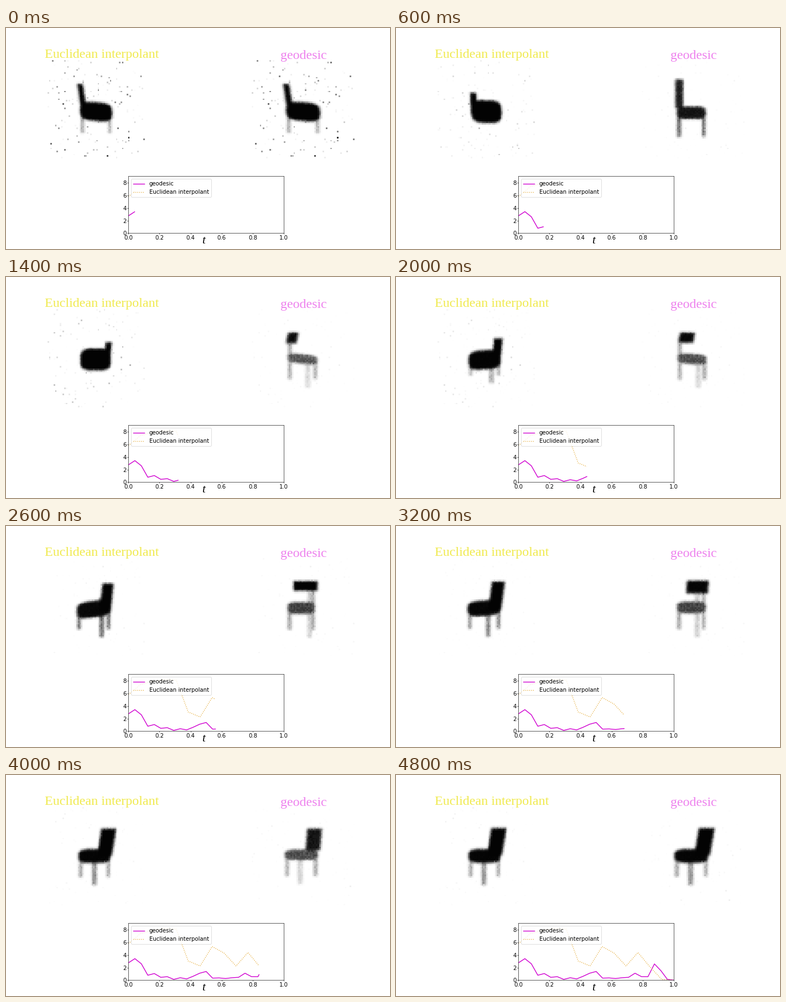
A matplotlib script for the animation above (5000 ms loop, 694x400 px).

```python
import numpy as np
import matplotlib.pyplot as plt
from matplotlib.animation import FuncAnimation

W, H, DPI = 694, 400, 100
FRAMES, INTERVAL = 25, 200
GRID, FINE = 64, 3
LEFT = (75, 251, 236.5, 58.6)
RIGHT = (444, 629.5, 236.5, 58.6)

# The two plotted series: speed at evenly spaced t
GEO_Y = np.array([2.75, 3.42, 2.6, .78, 1.05, .45, .55, .12, .38, .2, .62, 1.1, 1.38,
                  .32, .35, .26, .38, .45, 1.1, .56, .55, 2.58, 1.5, .12, 0])
EUC_Y = np.array([5.8, 7.4, 7.9, 8.2, 8.1, 3.05, 2.25, 5.35, 4.3, 2.25, 4.4, 2.1, .1, 0])
GEO_X = np.linspace(0, 1, len(GEO_Y))
EUC_X = np.linspace(0, 1, len(EUC_Y))
TIMES = (np.arange(FRAMES) + 1) / FRAMES

# Fine sample points and a matrix that blurs and shrinks to the coarse grid
centres = (np.arange(GRID * FINE) + .5) / (GRID * FINE)
X, Y = np.meshgrid(LEFT[0] + centres * (LEFT[1] - LEFT[0]),
                   LEFT[3] + centres * (LEFT[2] - LEFT[3]))
cells = (np.arange(GRID) + .5)[:, None]
SOFTEN = np.exp(-(centres * GRID - cells) ** 2 / (2 * .75 ** 2))
SOFTEN /= SOFTEN.sum(axis=1, keepdims=True)
GRAIN = np.random.default_rng(4).normal(0, .2, (GRID, GRID))


def chair(back, seat, feet, middle, shades=(1, 1, .4, 0), dust=.01):
    """back: x, y, w, h, lean; seat: x, y, w, h, tilt; feet: floor height;
    middle: x of the middle leg; shades: back, seat, side legs, middle leg."""
    return np.array([*back, *seat, feet, middle, *shades, dust], float)


START = chair((137.5, 127, 10, 50, -7), (163, 152, 58, 34, 5), 191, 165,
              (1, 1, .35, 0), dust=.15)
END = chair((182, 122, 27, 50, 8), (160, 147, 58, 25, 0), 185, 159, (1, .98, .36, .42))

EUCLIDEAN = {
    0: START,
    3: chair((140.5, 138, 11, 40, -2), (164, 152, 54, 41, 2), 170, 168,
             (1, 1, 0, 0), dust=.05),
    7: chair((184, 138, 11, 38, 4), (162, 150, 55, 40, 0), 170, 172,
             (1, 1, 0, 0), dust=.06),
    13: chair((182, 131, 20, 52, 5), (159, 151, 62, 30, -8), 187, 173, (1, .97, .55, .6)),
    21: END,
}
GEODESIC = {
    0: START,
    3: chair((139.5, 120, 13, 52, 0), (160, 154, 50, 23, 0), 198, 168, (.88, .92, .62, 0)),
    7: chair((144.5, 111, 18, 19, 4), (162, 149, 51, 17, 6), 186, 171, (.95, .65, .35, .15)),
    13: chair((167, 109, 41, 18, 0), (160, 149, 47, 22, 0), 188, 174, (1, .75, .35, .2)),
    20: chair((181, 117, 25, 39, 3), (160, 145, 57, 19, 0), 184, 158, (.92, .7, .35, .17)),
    23: END,
}


def draw_chair(pose):
    bx, by, bw, bh, lean = pose[:5]
    sx, sy, sw, sh, tilt = pose[5:10]
    feet, middle, back_shade, seat_shade, side_shade, middle_shade = pose[10:16]

    def leg(x, bottom, width):
        # A leg under the back continues upwards as its post
        top = by if abs(x - bx) < bw / 2 else sy
        return (abs(X - x) < width / 2) & (Y > top) & (Y < bottom)

    rise = (Y - by) / bh
    back = (abs(X - bx + lean * rise) < bw / 2) & (abs(rise) < .5)
    across = (X - sx) / sw
    seat = abs(2 * across) ** 3.5 + abs(2 * (Y - sy - tilt * across) / sh) ** 3.5 < 1
    sides = leg(sx - .43 * sw, feet, 6) | leg(sx + .43 * sw, feet, 6)
    return np.max([back * back_shade, seat * seat_shade, sides * side_shade,
                   leg(middle, feet + 14, 8) * middle_shade], axis=0)


def dust(seed, level):
    rng = np.random.default_rng(seed)
    return (rng.random((GRID, GRID)) < .035) * rng.exponential(level, (GRID, GRID))


def mix(a, b, k):
    return a + (b - a) * k


def morph(poses, xs, ys):
    """Blend poses, moving at the pace that the plotted speed gives."""
    speed = np.interp(TIMES, xs, ys) + .01
    travelled = np.concatenate([[0], np.cumsum((speed[1:] + speed[:-1]) / 2)])
    keys, shapes = list(poses), list(poses.values())
    fields = [dust(key, pose[-1]) for key, pose in poses.items()]
    images = []
    for place in np.interp(travelled, travelled[keys], np.arange(len(keys))):
        i = min(int(place), len(keys) - 2)
        k = place - i
        soft = SOFTEN @ draw_chair(mix(shapes[i], shapes[i + 1], k)) @ SOFTEN.T
        soft = soft + GRAIN * soft * (1 - soft)
        field = mix(fields[i], fields[i + 1], k)
        images.append(1 - np.clip(np.maximum(soft, field), 0, .985))
    return images


def px(size):
    return size * 72 / DPI


fig = plt.figure(figsize=(W / DPI, H / DPI), dpi=DPI, facecolor="white")
stage = fig.add_axes([0, 0, 1, 1])
panels = [(stage.imshow(images[0], cmap="gray", vmin=0, vmax=1, extent=box,
                        interpolation="nearest", aspect="auto"), images)
          for images, box in ((morph(EUCLIDEAN, EUC_X, EUC_Y), LEFT),
                              (morph(GEODESIC, GEO_X, GEO_Y), RIGHT))]
stage.set(xlim=(0, W), ylim=(H, 0))
stage.axis("off")

serif = dict(family="Liberation Serif", va="baseline")
stage.text(70, 54, "Euclidean interpolant", color="#f0ea50", size=px(24), **serif)
stage.text(496, 56, "geodesic", color="#ee82ee", size=px(24), **serif)
stage.text(357.5, 389.5, "t", style="italic", ha="center", size=px(21), **serif)

plt.rcParams["font.family"] = "DejaVu Sans"
plot = fig.add_axes([221.2 / W, 1 - 371.3 / H, 281 / W, 103 / H])
plot.patch.set_alpha(0)
geo_line, = plot.plot([], [], color="#d000d0", lw=px(1.4), label="geodesic")
euc_line, = plot.plot([], [], ":", color="#e6ac38", lw=px(1.3),
                      label="Euclidean interpolant")
plot.set(xlim=(0, 1), ylim=(0, 9.05), xticks=np.arange(6) / 5, yticks=range(0, 9, 2))
plot.tick_params(length=1.1, pad=1.3, width=.5, labelsize=px(10.1))
plot.tick_params(axis="x", pad=1.9)
for spine in plot.spines.values():
    spine.set(linewidth=px(.8), edgecolor="#333333")
legend = plot.legend(loc="upper left", fontsize=px(10.1))
legend.get_frame().set_linewidth(px(.8))


def trace(line, xs, ys, t):
    seen = xs < t
    line.set_data(np.append(xs[seen], t), np.append(ys[seen], np.interp(t, xs, ys)))


def update(i):
    for artist, images in panels:
        artist.set_data(images[i])
    trace(geo_line, GEO_X, GEO_Y, TIMES[i])
    trace(euc_line, EUC_X, EUC_Y, TIMES[i])
    return [artist for artist, _ in panels] + [geo_line, euc_line]


animation = FuncAnimation(fig, update, frames=FRAMES, interval=INTERVAL,
                          repeat=True, repeat_delay=0)
plt.show()
```
